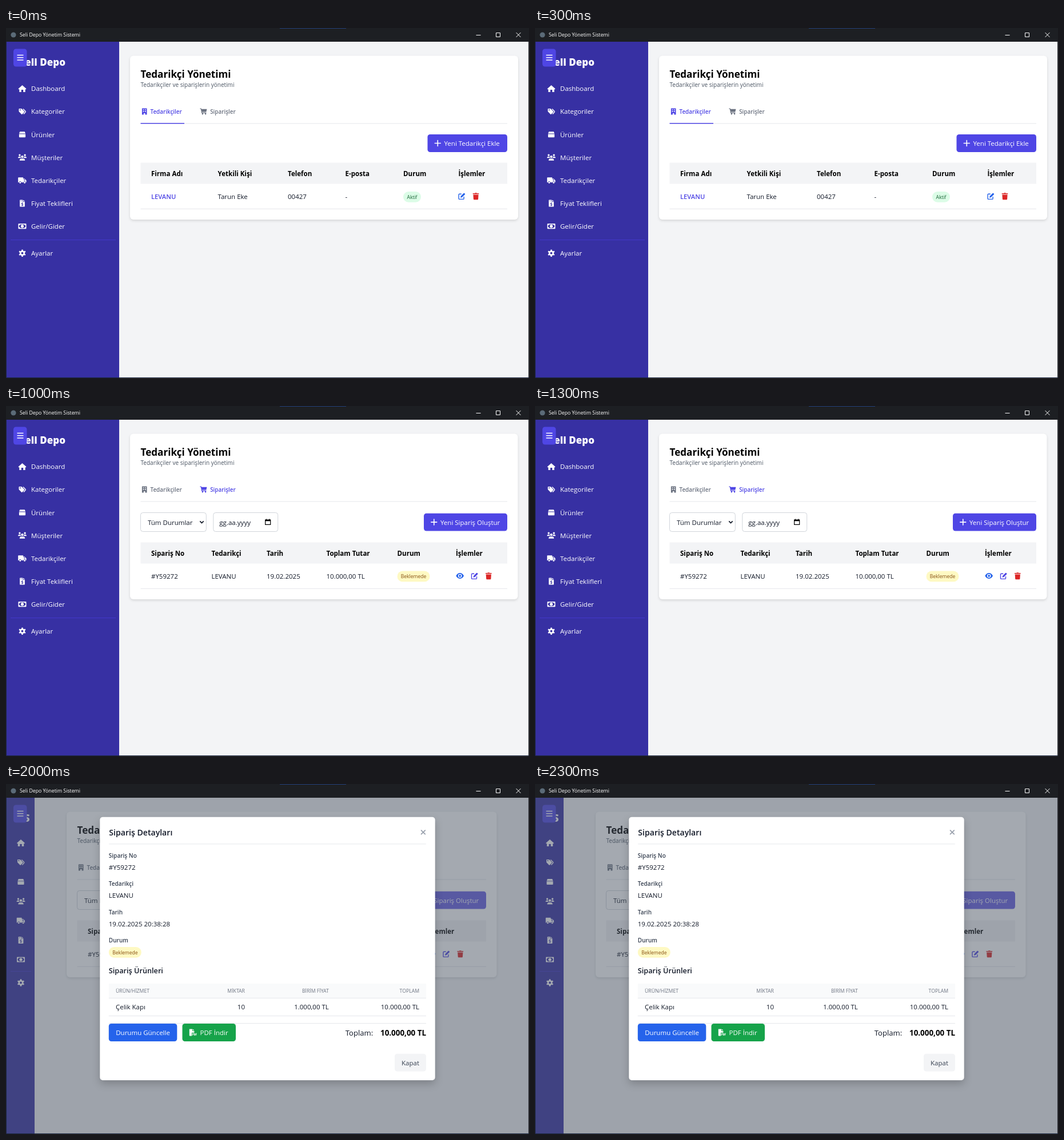
An HTML page that plays this animation: 915 by 612 pixels, repeating every 2500 ms.

```html
<!DOCTYPE html>
<html lang="tr">
<head>
<meta charset="utf-8">
<title>Stok paneli</title>
<style>
html, body { margin: 0; width: 100%; height: 100%; overflow: hidden; background: #f3f4f6; }
svg { display: block; width: 915px; height: 612px; font-family: "Open Sans", "Noto Sans", sans-serif; }
.card { filter: drop-shadow(0 2px 2px rgba(0,0,0,.12)); }
.modal { filter: drop-shadow(0 6px 7px rgba(0,0,0,.2)); }
</style>
</head>
<body>
<svg id="stage" viewBox="0 0 915 612" xmlns="http://www.w3.org/2000/svg"></svg>
<script>
const STEP = 500, STEPS = 5;
const INDIGO = '#4f46e5', BLUE = '#2563eb', RED = '#dc2626', GREEN = '#16a34a';
const INK = '#111827', LABEL = '#374151', MUTED = '#6b7280', LINE = '#e5e7eb', EDGE = '#d1d5db', PALE = '#f3f4f6';
const APP = 'Seli Depo', FIRM = 'LEVANU', ORDER = '#Y59272';

// Basic shapes
const rect = (x, y, x2, y2, fill, r = 0, more = '') =>
  `<rect x="${x}" y="${y}" width="${x2 - x}" height="${y2 - y}" rx="${r}" fill="${fill}" ${more}/>`;
const text = (x, y, s, size = 11.5, fill = INK, weight = 400, anchor = 'start') =>
  `<text x="${x}" y="${y}" font-size="${size}" fill="${fill}" font-weight="${weight}" text-anchor="${anchor}">${s}</text>`;
const path = (d, stroke, w = 1, more = '') =>
  `<path d="${d}" fill="none" stroke="${stroke}" stroke-width="${w}" ${more}/>`;
const move = (x, y, s) => `<g transform="translate(${x} ${y})">${s}</g>`;
const rule = (x, x2, y, color = LINE) => path(`M${x} ${y}H${x2}`, color);

// Icons are drawn around their own centre
const solid = d => c => `<path d="${d}" fill="${c}" fill-rule="evenodd"/>`;
const gearTeeth = [0, 60, 120, 180, 240, 300]
  .map(a => `<path d="M-1.5-3.5L-1.1-6.3H1.1L1.5-3.5Z" transform="rotate(${a})"/>`).join('');
const icons = {
  home: solid('M-7 .3L0-6 7 .3 6.3 1.2H5.2V6H1.7V2H-1.7V6H-5.2V1.2H-6.3Z'),
  tags: c => solid('M-6-4.6Q-6-5-5.5-5H-1.2L3.6-.2Q4 .3 3.6 .8L-.4 4.8Q-.9 5.1-1.4 4.7L-6 0ZM-4.6-2.9a1 1 0 1 0 2 0a1 1 0 1 0-2 0')(c) +
    path('M1.4-4.6L5.4-.6Q6.2 .3 5.4 1.2L2.3 4.5', c, 1.4),
  box: solid('M-4.2-5H4.2L5.6-1.6H-5.6ZM-5.6-.8H5.6V4Q5.6 5 4.6 5H-4.6Q-5.6 5-5.6 4Z'),
  users: solid('M-2.2-1.2a2.2 2.2 0 1 0 4.4 0a2.2 2.2 0 1 0-4.4 0M-6.3-4a1.7 1.7 0 1 0 3.4 0a1.7 1.7 0 1 0-3.4 0M2.9-4a1.7 1.7 0 1 0 3.4 0a1.7 1.7 0 1 0-3.4 0' +
    'M-4.7 5.5Q-4.7 1.9-1.5 1.9H1.5Q4.7 1.9 4.7 5.5ZM-7.5 1Q-7.5-1.6-5-1.6H-3Q-3.4 .3-2.1 1ZM7.5 1Q7.5-1.6 5-1.6H3Q3.4 .3 2.1 1Z'),
  truck: solid('M-7.3-4.5Q-7.3-5.2-6.5-5.2H1Q1.7-5.2 1.7-4.5V-3H4L7-.2V3.6H6.2a2.1 2.1 0 0 0-4.2 0H-1.6a2.1 2.1 0 0 0-4.2 0H-7.3ZM2.8-1.9V0H5.6L3.6-1.9Z' +
    'M-5.2 3.8a1.5 1.5 0 1 0 3 0a1.5 1.5 0 1 0-3 0M2.6 3.8a1.5 1.5 0 1 0 3 0a1.5 1.5 0 1 0-3 0'),
  invoice: c => solid('M-4.4-5.2Q-4.4-6-3.6-6H.6V-2.7H4.4V5.2Q4.4 6 3.6 6H-3.6Q-4.4 6-4.4 5.2ZM1.4-6L4.4-3.4H1.4Z')(c) +
    path('M1.5-.4H-.6Q-1.5-.4-1.5 .6T-.4 1.8H.4Q1.5 1.9 1.5 2.9T.6 4H-1.5M0-1.2V4.8M-3-4.2H-1', '#3730a3', .8),
  money: solid('M-7-3.4Q-7-4.6-6-4.6H6Q7-4.6 7-3.4V3.4Q7 4.6 6 4.6H-6Q-7 4.6-7 3.4ZM-5.6-1.5V1.5Q-4 1.7-3.7 3.2H3.7Q4 1.7 5.6 1.5V-1.5Q4-1.7 3.7-3.2H-3.7Q-4-1.7-5.6-1.5ZM-2.6 0a2.6 2.6 0 1 0 5.2 0a2.6 2.6 0 1 0-5.2 0'),
  gear: c => `<g fill="${c}">${gearTeeth}</g><circle r="3.2" fill="none" stroke="${c}" stroke-width="2.6"/>`,
  building: solid('M-4.3-5.5H4.3V5.5H1.3V3H-1.3V5.5H-4.3ZM-2.6-3.8V-2.2H-.8V-3.8ZM.8-3.8V-2.2H2.6V-3.8ZM-2.6-.9V.8H-.8V-.9ZM.8-.9V.8H2.6V-.9Z'),
  cart: c => solid('M-3.8-4.2H6L4.8 .8H-2.8ZM-2.8 4.3a1.2 1.2 0 1 0 2.4 0a1.2 1.2 0 1 0-2.4 0M2.4 4.3a1.2 1.2 0 1 0 2.4 0a1.2 1.2 0 1 0-2.4 0')(c) +
    path('M-6.2-5H-4.3L-2.8 2.3H4.9', c, 1.2),
  edit: c => path('M-.5-4H-4Q-5.2-4-5.2-2.8V4Q-5.2 5.2-4 5.2H2.6Q3.8 5.2 3.8 4V.8', c, 1.4) +
    solid('M-2.3 2.6L-1.6-.2 3.3-5.1Q4.1-5.9 4.9-5.1L5.5-4.5Q6.2-3.7 5.5-2.9L.6 1.9Z')(c),
  trash: solid('M-5.3-5.2H-2L-1.4-6H1.4L2-5.2H5.3V-3.7H-5.3ZM-4.6-2.8H4.6L4.1 5Q4 6 3 6H-3Q-4 6-4.1 5Z'),
  eye: c => solid('M-6.9 0Q-4.2-4.9 0-4.9T6.9 0Q4.2 4.9 0 4.9T-6.9 0ZM-3.3 0a3.3 3.3 0 1 0 6.6 0a3.3 3.3 0 1 0-6.6 0')(c) + `<circle r="1.9" fill="${c}"/>`,
  plus: c => path('M-5 0H5M0-5V5', c, 1.6, 'stroke-linecap="round"'),
  close: c => path('M-3.3-3.3L3.3 3.3M3.3-3.3L-3.3 3.3', c, 1.9, 'stroke-linecap="round"'),
  chevron: c => path('M-3.2-1.7L0 1.6 3.2-1.7', c, 1.7),
  calendar: c => path('M-4.5-3.8H4.5V4.4H-4.5Z', c, 1.2) + path('M-4.5-2.8H4.5', c, 2.2) + path('M-2.7-5.4V-3M2.7-5.4V-3', c, 1.3),
  file: c => solid('M-6-6H-.8V-2.6H2.6V.2H-1.8V6H-5.2Q-6 6-6 5.2ZM0-6L2.6-3.4H0Z')(c) +
    path('M-.4 5.4V1.6H.6Q1.4 1.6 1.4 2.5T.4 3.5M2.6 1.7V5H3.2Q4.2 5 4.2 3.4T3.2 1.7ZM5.4 5.4V1.7H6.9M5.4 3.4H6.7', c, .9)
};
const icon = (name, x, y, color = '#fff', k = 1) =>
  `<g transform="translate(${x} ${y}) scale(${k})">${icons[name](color)}</g>`;

// Controls
const field = (x, y, x2, y2) => rect(x, y, x2, y2, '#fff', 4, `stroke="${EDGE}"`);
const select = (x, y, x2, y2, s) =>
  field(x, y, x2, y2) + text(x + 12.5, (y + y2) / 2 + 5, s) + icon('chevron', x2 - 7.8, (y + y2) / 2, INK);
const dateBox = (x, y, x2, y2) =>
  field(x, y, x2, y2) + text(x + 10.5, (y + y2) / 2 + 4.8, 'gg.aa.yyyy') + icon('calendar', x2 - 17.5, (y + y2) / 2, '#000');
const button = (x, y, x2, y2, s, fill = INDIGO, color = '#fff') =>
  rect(x, y, x2, y2, fill, 4.5) + text((x + x2) / 2, (y + y2) / 2 + 4.4, s, 11.5, color, 400, 'middle');
const plusButton = (x, y, x2, y2, s, fill) =>
  rect(x, y, x2, y2, fill, 4.5) + icon('plus', x + 17.8, (y + y2) / 2) + text(x + 29, (y + y2) / 2 + 4.4, s, 11.5, '#fff');
const badge = (x, y, x2, s, fill, color) =>
  rect(x, y, x2, y + 18.7, fill, 9.3) + text((x + x2) / 2, y + 12.6, s, 8.5, color, 400, 'middle');
const waiting = (x, y) => badge(x, y, x + 57, 'Beklemede', '#fef9c3', '#854d0e');
const label = (x, y, s) => text(x, y, s, 10.05, LABEL, 600);
const head = (x, y, s) => text(x, y, s, 11.55, '#000', 700);
const small = (x, y, s, anchor) => text(x, y, s, 8.7, MUTED, 500, anchor);
const dialog = (x, y, x2, y2, title, body) =>
  `<g class="modal">${rect(x, y, x2, y2, '#fff', 5)}</g>` +
  text(x + 16, y + 32.6, title, 14.1, INK, 600) + icon('close', x2 - 20.8, y + 26.7, '#9ca3af') +
  rule(x + 16, x2 - 16, y + 47.2) + body;

function frame() {
  return rect(0, 0, 915, 24, '#1d1f23') + rect(479, 0, 595, 1, '#22407a') +
    rect(0, 24, 1, 612, '#1a2740') + rect(914, 24, 915, 612, '#26292f') + rect(0, 611, 915, 612, '#1a2740') +
    '<circle cx="13" cy="12" r="4.6" fill="#5b6b78"/>' +
    text(24, 15.4, APP + ' Yönetim Sistemi', 8.75, '#fff') +
    path('M822.5 12.5H830.5M857.5 8.5H864.5V15.5H857.5ZM892.5 8L900.5 16M900.5 8L892.5 16', '#fff');
}

const menu = [['home', 'Dashboard'], ['tags', 'Kategoriler'], ['box', 'Ürünler'], ['users', 'Müşteriler'],
  ['truck', 'Tedarikçiler'], ['invoice', 'Fiyat Teklifleri'], ['money', 'Gelir/Gider'], ['gear', 'Ayarlar']];

function sidebar(slim) {
  const x = slim ? 26 : 28.5, end = slim ? 50 : 198;
  let s = rect(1, 24, end, 611, '#3730a3');
  s += slim ? text(41.5, 65.5, APP[0], 17, '#fff', 800, 'end') : text(23.5, 65.5, APP, 17, '#fff', 800);
  s += rect(13, 36.5, 36.5, 67.5, INDIGO, 4.5) + path('M19.5 47.5H30.5M19.5 51.8H30.5M19.5 56H30.5', '#fff', 1.5);
  menu.forEach(([name, title], i) => {
    const last = i === 7;
    const y = slim ? 103 + i * 34 + (last ? 6.5 : 0) : 106 + i * 40.1 + (last ? 7 : 0);
    s += icon(name, x, y);
    if (!slim) s += text(44, y + 4.3, title, 11.5, '#fff');
  });
  return s + rule(8, end - 6, slim ? 327.5 : 370.5, '#4338ca');
}

function tabs(orders) {
  const tab = (x, name, s, on) => {
    const c = on ? INDIGO : MUTED;
    return icon(name, x, 146, c) + text(x + (name === 'cart' ? 11.7 : 10.3), 149.8, s, 9.9, c, 600);
  };
  return text(235.5, 87, 'Tedarikçi Yönetimi', 17.1, '#000', 700) +
    text(235.5, 103.4, 'Tedarikçiler ve siparişlerin yönetimi', 10.03, '#4b5563') +
    tab(242.2, 'building', 'Tedarikçiler', !orders) + tab(345.5, 'cart', 'Siparişler', orders);
}

function suppliers(dim) {
  const cols = [254, 370.5, 493, 593.5, 695, 791.5];
  const names = ['Firma Adı', 'Yetkili Kişi', 'Telefon', 'E-posta', 'Durum', 'İşlemler'];
  return `<g class="card">${rect(217, 48.5, 896, 335, '#fff', 6)}</g>` + tabs(false) +
    rule(235.5, 877, 167) + path('M235.5 166.8H312', INDIGO, 1.5) +
    plusButton(737.5, 186, 877, 217, 'Yeni Tedarikçi Ekle', dim ? '#675fe4' : INDIGO) +
    rect(235.5, 235.5, 877, 272.5, PALE) + names.map((n, i) => head(cols[i], 258.6, n)).join('') +
    text(254, 298.8, FIRM, 11.2, INDIGO, 600) +
    ['Tarun Eke', '00427', '-'].map((v, i) => text(cols[i + 1], 298.8, v)).join('') +
    badge(695, 286, 726, 'Aktif', '#dcfce7', '#166534') +
    icon('edit', 797.3, 294.2, BLUE) + icon('trash', 822, 294.2, RED) + rule(235.5, 877, 316.3);
}

function orders(slim) {
  const left = slim ? -111 : 0, right = slim ? -37 : 0, ops = slim ? -49.5 : 0;
  const x = 235.5 + left, end = 877 + right, cols = [254, 359.5, 456, 560.5, 684.5];
  const row = ['Sipariş No', 'Tedarikçi', 'Tarih', 'Toplam Tutar', 'Durum'];
  const vals = [ORDER, FIRM, '19.02.2025', '10.000,00 TL'];
  return `<g class="card">${rect(217 + left, 48.5, 895.5 + right, 338, '#fff', 6)}</g>` +
    rule(x, end, 167) + rect(x, 238.5, end, 275.5, PALE) +
    move(left, 0, tabs(true) + select(235.5, 186.5, 350.3, 219.5, 'Tüm Durumlar') + dateBox(362.8, 186.5, 475.7, 219.5) +
      row.map((n, i) => head(cols[i], 261.6, n)).join('') + vals.map((v, i) => text(cols[i], 301.6, v)).join('') +
      waiting(684.5, 288.6)) +
    move(right, 0, plusButton(731, 187.7, 877, 218.5, 'Yeni Sipariş Oluştur', slim ? '#675fe4' : INDIGO)) +
    move(ops, 0, head(787, 261.6, 'İşlemler') + icon('eye', 794.2, 297, BLUE) +
      icon('edit', 819.7, 297.2, INDIGO) + icon('trash', 844.3, 297.2, RED)) +
    rule(x, end, 319.3);
}

const shade = x => rect(x, 24, 914, 611, 'rgb(75,85,99)', 0, 'fill-opacity=".5"');

function supplierForm() {
  const a = 242.3, b = 463.8;
  return dialog(226, 86, 689, 497, 'Yeni Tedarikçi Ekle',
    label(a, 157.6, 'Firma Adı') + label(b, 157.6, 'Yetkili Kişi') +
    rect(a, 164.7, 451.3, 197, '#fff', 4, 'stroke="#6366f1" stroke-width="1.6"') + path('M252.7 173V189', '#000', 1.1) +
    field(b, 165, 672.5, 196.5) +
    label(a, 220.8, 'Telefon') + label(b, 220.8, 'E-posta') + field(a, 228, 451, 260) + field(b, 228, 672.5, 260) +
    label(a, 284, 'Vergi No') + label(b, 284, 'Durum') + field(a, 291.4, 451, 323.4) + select(b, 291.4, 672.5, 322.6, 'Aktif') +
    label(a, 347.2, 'Adres') + field(a, 354.5, 672.5, 423.5) + path('M664.5 422L671.5 415M668.5 422L671.5 419', MUTED, .9) +
    button(553, 450, 602, 481, 'İptal', PALE, LABEL) + button(611, 450, 673, 481, 'Kaydet'));
}

function orderForm() {
  return dialog(149, 86, 766, 447.5, 'Yeni Sipariş Oluştur',
    label(165.3, 157.6, 'Tedarikçi') + label(463.8, 157.6, 'Sipariş Durumu') +
    select(165.3, 164.6, 451, 196, 'Tedarikçi Seçin') + select(463.8, 164.6, 749.7, 196, 'Beklemede') +
    label(165.3, 220, 'Sipariş Tarihi') + dateBox(165.3, 227.2, 451, 260.7) +
    rect(165, 273.5, 750, 298, '#f9fafb') + rule(165, 750, 298.4) +
    small(177.5, 289.2, 'KATEGORİ') + small(296, 289.2, 'ÜRÜN') + small(550, 289.2, 'MİKTAR', 'end') +
    small(687.8, 289.2, 'BİRİM FİYAT', 'end') + small(712, 289.2, 'İŞLEM') +
    field(177.6, 305.6, 271.4, 330.8) + icon('chevron', 263.7, 318, INK) +
    '<clipPath id="cut"><rect x="180" y="306" width="72" height="24"/></clipPath>' +
    `<g clip-path="url(#cut)">${text(187.3, 322.8, 'Tüm Kategoriler')}</g>` +
    field(296.2, 305.2, 408.7, 330.8) + text(303, 322.6, 'Ürün Ara...', 11.5, '#9ca3af') +
    field(433.8, 305.2, 549.3, 330.8) + text(531, 322.6, '1', 11.5, INK, 400, 'end') + field(574.2, 305.2, 687.3, 330.8) +
    icon('trash', 725, 318.2, RED) +
    rect(165, 349.5, 248, 379, INDIGO, 4) + icon('plus', 179.8, 364.3, '#fff', .85) + text(190.8, 368.2, 'Ürün Ekle', 9.9, '#fff', 600) +
    text(651.3, 369.8, 'Toplam:', 13.1) + text(750, 369.8, '0,00 ₺', 13.4, '#000', 700, 'end') +
    button(630.3, 400.7, 679, 431.5, 'İptal', PALE, LABEL) + button(688, 400.7, 750, 431.5, 'Kaydet'));
}

function orderDetails() {
  const info = [['Sipariş No', ORDER], ['Tedarikçi', FIRM], ['Tarih', '19.02.2025 20:38:28'], ['Durum', '']];
  const x = 179.8, cells = ['10', '1.000,00 TL', '10.000,00 TL'], ends = [418, 564.8, 723];
  return dialog(164.3, 57.7, 750.7, 518, 'Sipariş Detayları',
    info.map(([k, v], i) => label(x, 129 + i * 49.4, k) + text(x, 149.8 + i * 49.4, v)).join('') +
    waiting(x, 285) + text(x, 331, 'Sipariş Ürünleri', 12.7, INK, 600) +
    rect(x, 349, 735, 374, '#f9fafb') + rule(x, 735, 374.4) + small(192, 364.8, 'ÜRÜN/HİZMET') +
    ['MİKTAR', 'BİRİM FİYAT', 'TOPLAM'].map((h, i) => small(ends[i], 364.8, h, 'end')).join('') +
    text(192, 394.4, 'Çelik Kapı') + cells.map((v, i) => text(ends[i], 394.4, v, 11.5, INK, 400, 'end')).join('') +
    rule(x, 735, 405.5) + rule(x, 735, 418.5) +
    button(x, 419, 299.3, 450, 'Durumu Güncelle', BLUE) +
    rect(308.5, 419, 402, 450, GREEN, 4.5) + icon('file', 326.8, 434.5) + text(339.5, 438.9, 'PDF İndir', 11.5, '#fff') +
    text(593.7, 439.6, 'Toplam:', 13.1) + text(735, 439.6, '10.000,00 TL', 13.4, '#000', 700, 'end') +
    button(680, 471.8, 735, 502.5, 'Kapat', PALE, LABEL));
}

const scenes = [
  () => suppliers() + sidebar(),
  () => suppliers(true) + shade(198) + sidebar() + supplierForm(),
  () => orders() + sidebar(),
  () => orders(true) + shade(50) + sidebar(true) + orderForm(),
  () => orders(true) + sidebar(true) + shade(1) + orderDetails()
];

const stage = document.getElementById('stage');
let shown = -1;
function draw(ms) {
  const n = Math.floor(ms / STEP) % STEPS;
  if (n === shown) return;
  shown = n;
  stage.innerHTML = rect(0, 0, 915, 612, PALE) + scenes[n]() + frame();
}
const start = performance.now();
function tick() {
  draw(performance.now() - start);
  requestAnimationFrame(tick);
}
tick();
</script>
</body>
</html>
```
